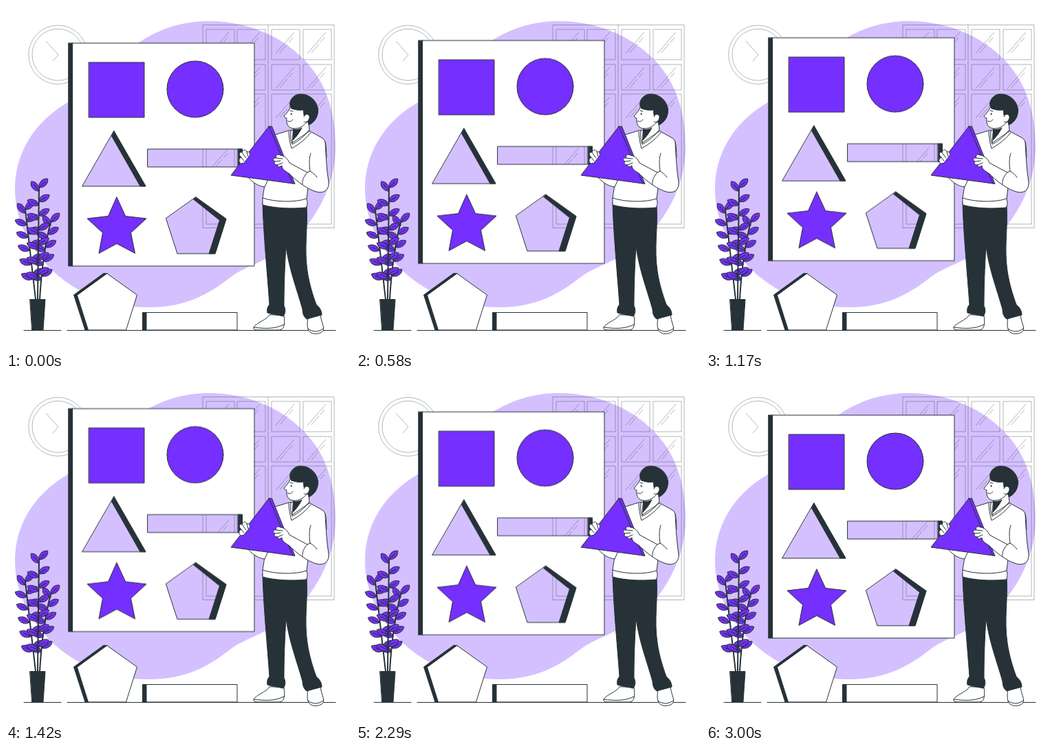
These frames come from a looping animation (500 px wide and 500 px high, 3.04 s). An HTML page:

```html
<!DOCTYPE html>
<html lang="en">
<head>
<meta charset="utf-8">
<title>Shape sorting</title>
<style>
  html, body { margin: 0; width: 100%; height: 100%; overflow: hidden; background: #fff; }
  svg { display: block; width: 100vw; height: 100vh; }
  .ink { stroke: #263238; stroke-width: 1; stroke-linejoin: round; stroke-linecap: round; }
  .line { fill: none; }
  .white { fill: #fff; }
  .dark { fill: #263238; }
  .purple { fill: #752ffe; }
  .pale { fill: #d5c0ff; }
  .faint { fill: none; stroke: #263238; stroke-opacity: .5; stroke-width: .7; }
  #board { animation: float 3040ms linear infinite; }
  @keyframes float {
    0%, 98.68%, 100% { transform: translateY(0); }
    49.34% { transform: translateY(-10px); }
  }
</style>
</head>
<body>
<svg viewBox="0 0 500 500">
  <path class="pale" d="M295 22C360 22 415 51 447 94C470 125 479 165 479 205C479 260 450 318 402 353C370 375 345 379 324 396C292 421 258 438 208 438C165 438 125 426 95 406C45 374 13 320 13 266C13 218 37 171 90 140C130 118 160 72 195 52C225 32 258 22 295 22Z"/>

  <g id="clock" class="faint">
    <circle cx="75.500" cy="70.800" r="42.700"/>
    <circle cx="75.500" cy="70.800" r="37.500"/>
    <path d="M58 51L76 71L68 80"/>
  </g>

  <g id="window" class="faint">
    <path d="M286 27.500H477V322.500H286ZM381 27.500V322.500"/>
  </g>

  <path class="ink line" d="M26 471.500H80M89 471.500H479"/>

  <g id="plant">
    <path class="ink dark" d="M35 426.500H57L54 471H38Z"/>
  </g>

  <g id="board" class="ink">
    <path class="dark" d="M90.500 54H98V378H90.500Z"/>
    <path class="white" fill-rule="evenodd" d="M97 54H361V378H97ZM157 182L203 262H111ZM206 208H343.500V234H206ZM276 278L320 309.500L304 360H249L232.500 309Z"/>
    <path class="dark" d="M157 182L203 262H195L153.500 189ZM337.500 208H343.500V234H337.500ZM276 278L320 309.500L304 360H295L310.500 311.500L272.500 281Z"/>
    <path class="purple" d="M120.500 82H201V162H120.500Z"/>
    <circle class="purple" cx="275" cy="121" r="41"/>
    <path class="purple" d="M161 278L173.700 305.500L204 309L181.500 329.700L187.500 359.500L161 345.500L135 359.500L140.500 329.700L118 309L148.300 305.500Z"/>
  </g>

  <g id="floor" class="ink">
    <path class="dark" d="M147 389L142 388.500L98.500 420L115 471H120L110 420Z"/>
    <path class="white" d="M147 389L190.500 420L174.500 471H119.500L103.500 420.500Z"/>
    <path class="white" d="M199 445.500H336V471H199Z"/>
    <path class="dark" d="M199 445.500H204V471H199Z"/>
  </g>

  <g id="man" class="ink">
    <path class="white" d="M383 449C378 457 364 460 360 467C359 471 364 471 370 471H398C404 470 406 463 404 450Z"/>
    <path class="line" d="M360 467C375 469 390 470 404 463"/>
    <path class="white" d="M439 453C437 463 438 471 442 474C447 478 457 477 461 472C463 465 458 460 457 448Z"/>
    <path class="line" d="M439 469C446 475 456 474 462 468"/>
    <path class="dark" d="M373 286L437 290C439 325 433 350 438 385C441 405 446 420 451 434C456 438 459 443 459 449C452 451 444 453 437 455C433 452 431 447 431 441C423 412 412 385 407 350C405 380 404 410 404 436C407 441 406 447 403 451C395 449 387 448 380 446C379 441 380 437 383 434C380 390 374 330 373 286Z"/>

    <!-- torso -->
    <path class="white" d="M411 181L388 188L376 260L373 279V289C390 294 415 295 436 293C439 289 438 284 437 280L442 240L466 220C465 205 466 196 460 192C453 188 447 185 440 181Z"/>
    <path class="line" d="M373 279C390 285 420 286 437 280M443 214C440 222 441 232 442 240"/>
    <path class="white" d="M352 249C359 257 367 262 376 263L381 252Z"/>

    <!-- head -->
    <path class="white" d="M418 176L416 199L441 182L440 168Z"/>
    <path class="dark" d="M418 179C423 180 427 179 430 177C426 185 422 190 417 195Z"/>
    <path class="line" d="M411 182C411 190 413 200 415 207C426 201 436 193 443 184M414 181C413 188 414 195 416 201C426 196 434 189 440 181"/>
    <path class="white" d="M414 145C412 151 409 155 404 160C404 162 407 163 408 163C407 169 409 177 417 178C426 179 433 174 437 169L442 155L434 146Z"/>
    <path class="dark" d="M415 149C409 142 415 129 427 128C441 127 454 139 453.500 153C453 163 447 170 440 173C440 169 437 168 436 164C432 160 433 155 432 151C426 152 420 151 415 149Z"/>
    <path class="white" d="M433 161C435 155 442 157 441 163C439 169 435 170 433 168"/>
    <path class="line" d="M409 167C412 169 415 168 417 165M413 152L417 153"/>
    <circle class="dark" cx="414.500" cy="157" r=".7"/>

    <!-- held triangle -->
    <path class="purple" d="M382 175L386.500 175L420 258.500L416.500 258Z"/>
    <path class="purple" d="M382 175L327 246L416.500 258Z"/>

    <!-- hands and near arm -->
    <path class="white" d="M341 229C337 225 339 221 342 220C337 216 340 211 343 213C344 208 349 208 350 212C354 211 355 215 354 218L346 228Z"/>
    <path class="line" d="M342 220L346 225M343 213L349 221M350 212L352 219"/>
    <path class="white" d="M464 198C465 217 466 238 469 256C470 268 461 273 451 270C437 266 422 254 412 244C407 240 401 238 401 232C397 235 394 234 395 231C390 231 389 228 391 226C387 224 388 220 393 221C391 216 395 215 399 217C406 218 410 223 412 228L438 242L442 240"/>
    <path class="line" d="M391 226L399 225M395 231L402 228M393 221L402 222M438 242C433 247 430 254 431 259M442 240C447 243 450 246 452 249"/>
  </g>
</svg>
<script>
  const NS = 'http://www.w3.org/2000/svg';

  function add(parent, d, className = '') {
    const path = document.createElementNS(NS, 'path');
    path.setAttribute('d', d);
    path.setAttribute('class', className);
    document.getElementById(parent).append(path);
    return path;
  }

  function addGlint(x, y) {
    add('window', `M${x + 6} ${y + 35}L${x + 33} ${y + 4}M${x + 12} ${y + 34}L${x + 23} ${y + 21}M${x + 25} ${y + 19}L${x + 31} ${y + 12}`);
  }

  // Window panes; the tall lower ones have a second glint
  const rows = [[34, 78], [85, 122], [128, 317]];
  for (const x of [291, 336, 386, 432]) {
    for (const [top, bottom] of rows) {
      add('window', `M${x} ${top}H${x + 41}V${bottom}H${x}Z`);
      addGlint(x, top);
    }
    addGlint(x, 202);
  }

  // Each stem is a quadratic curve: root, bend, tip, number of leaf pairs
  const stems = [
    [[43, 426], [34, 350], [28, 296], 6],
    [[49, 426], [53, 360], [65, 314], 5],
    [[46, 426], [47, 340], [48, 264], 7]
  ];
  const leaf = 'M0 0C4 -6 13 -7 18 -1C14 5 5 5 0 0ZM0 0L12 -.6';

  for (const [root, bend, tip, pairs] of stems) {
    add('plant', `M${root}Q${bend} ${tip}`, 'ink line').style.strokeWidth = 2;
    for (let i = 0; i < pairs; i++) {
      const t = 1 - i * 0.92 / pairs;
      const [x, y] = [0, 1].map(k =>
        (1 - t) ** 2 * root[k] + 2 * t * (1 - t) * bend[k] + t * t * tip[k]);
      for (const [angle, drop] of [[-28, 0], [-154, 5]]) {
        const shape = add('plant', leaf, 'ink purple');
        const turn = i ? angle : angle + (angle < -90 ? 28 : -14);
        shape.setAttribute('transform', `translate(${x} ${y + drop}) rotate(${turn})`);
      }
    }
  }
</script>
</body>
</html>
```
